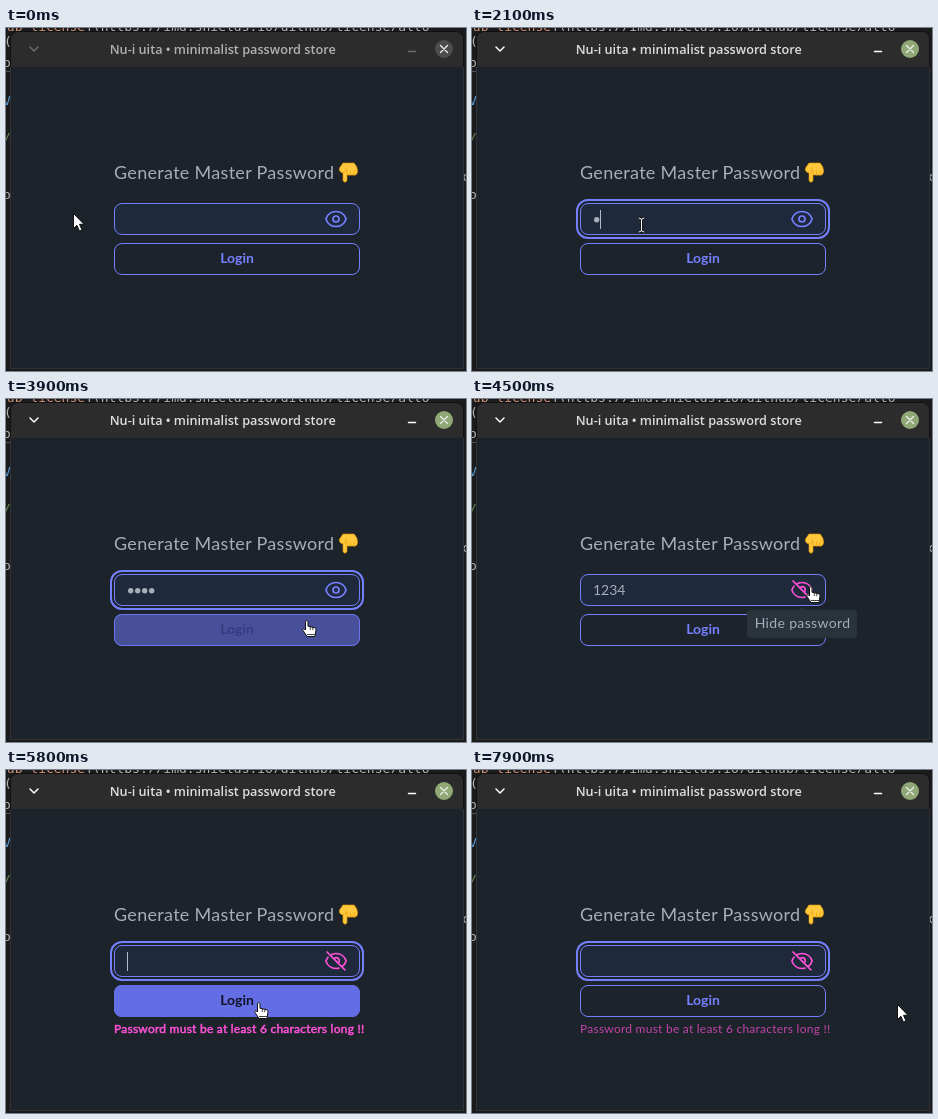
Recreate the animation shown at these times as an HTML page. Size 460 by 343 pixels, loop 8000 ms.

```html
<!DOCTYPE html>
<html lang="en">
<head>
<meta charset="utf-8">
<title>Password store</title>
<style>
  html, body { margin: 0; width: 100%; height: 100%; overflow: hidden; background: #1b1b1b; }
  svg { display: block; width: 460px; height: 343px; }
  text { font-family: Lato, sans-serif; font-size: 14px; fill: #a6adbb; white-space: pre; }
  .code { font: 13px "DejaVu Sans Mono", monospace; fill: #b4b4b4; }
  .title { font: 600 12.7px "Open Sans", sans-serif; text-anchor: middle; }
  .line { fill: none; stroke-linecap: round; stroke-linejoin: round; }
  .login { font-weight: 700; text-anchor: middle; }
  .tip { text-anchor: middle; letter-spacing: .35px; }
  .error { font-size: 12px; letter-spacing: .24px; fill: #ff52d9; stroke: #ff52d9; }
</style>
</head>
<body>
<svg viewBox="0 0 460 343">
  <!-- editor behind the window -->
  <rect width="460" height="343" fill="#1b1b1b"/>
  <text class="code" x="-7" y="3"><tspan fill="#ce9178">hub license</tspan>](https://img.shields.io/github/license/alto</text>
  <text class="code" x="-2" y="18">(</text>
  <text class="code" x="-3" y="39">o</text>
  <text class="code" x="-3" y="77" fill="#569cd6" style="fill:#569cd6">V</text>
  <text class="code" x="-3" y="114" style="fill:#6a8a5a">/</text>
  <text class="code" x="-3" y="171">o</text>
  <text class="code" x="456" y="153">c</text>
  <path d="M0 43.5H4" stroke="#555"/>

  <!-- window -->
  <path d="M4 341V12Q4 3 13 3H449Q458 3 458 12V341Z" fill="#111"/>
  <path d="M5 340V12Q5 4 13 4H449Q457 4 457 12V340Z" fill="#1d232a"/>
  <path d="M5 39V12Q5 4 13 4H449Q457 4 457 12V39Z" fill="#2c2c2c"/>
  <path d="M4.5 39V340.5H457.5V39" fill="none" stroke="#30343a"/>
  <text class="title" id="title" x="216.7" y="26">Nu-i uita • minimalist password store</text>
  <g class="line" id="controls" stroke-width="1.5">
    <path d="M24 19l4 4 4-4"/>
    <path d="M402.5 23.5h7"/>
  </g>
  <circle id="close" cx="438" cy="21" r="9"/>
  <path class="line" d="M434.5 17.5l7 7m0-7l-7 7" stroke="#eee" stroke-width="1.3"/>

  <!-- heading and pointing hand -->
  <text x="108" y="151" style="font-size:18px;letter-spacing:.3px">Generate Master Password</text>
  <g stroke="#e59600" stroke-width=".6">
    <path d="M337 135H348Q352 139 351.5 144Q350.5 148 347 147H341V152.5Q339 156 337 152.5V145Q332.5 144 333.5 140Z" fill="#ffc83d"/>
    <path class="line" d="M341 147V142.5M344.5 147.5V143M348 147V142.5M337 145Q341 144 340 140"/>
  </g>

  <!-- password field -->
  <rect id="ring" x="105" y="172" width="252" height="38" rx="11" fill="none" stroke="#7480ff" stroke-width="2"/>
  <rect x="108.5" y="175.5" width="245" height="31" rx="7.5" fill="#1e293b" stroke="#7480ff"/>
  <g id="dots" fill="#a6adbb"></g>
  <text id="plain" x="121" y="196">1234</text>
  <path id="caret" d="M.5 182V201" stroke="#b4bac6"/>
  <g class="line" transform="translate(318 179)" stroke-width="1.7">
    <g id="eye" stroke="#7480ff">
      <path d="M2 12.3a1 1 0 0 1 0-.6C3.4 7.5 7.4 4.5 12 4.5s8.6 3 10 7.2a1 1 0 0 1 0 .6C20.6 16.5 16.6 19.5 12 19.5S3.4 16.5 2 12.3Z"/>
      <circle cx="12" cy="12" r="3"/>
    </g>
    <path id="slashed" stroke="#ff52d9" d="M4 8.2A10.5 10.5 0 0 0 1.9 12C3.2 16.3 7.2 19.5 12 19.5q1.5 0 2.9-.4M6.2 6.2A10.5 10.5 0 0 1 12 4.5c4.8 0 8.8 3.2 10.1 7.5a10.5 10.5 0 0 1-4.3 5.8M3 3l6.9 6.9M21 21l-6.9-6.9a3 3 0 1 0-4.2-4.2l4.2 4.2"/>
  </g>

  <!-- button, error and tooltip -->
  <rect x="108.5" y="215.5" width="245" height="31" rx="7.5" fill="none" stroke="#7480ff"/>
  <text class="login" x="231" y="235" style="fill:#7480ff">Login</text>
  <g id="hover">
    <rect x="108" y="215" width="246" height="32" rx="8" fill="#646ee4"/>
    <text class="login" x="231" y="235" style="fill:#10122a">Login</text>
  </g>
  <text class="error" id="error" x="108" y="263">Password must be at least 6 characters long !!</text>
  <g id="tooltip">
    <rect id="tipBox" y="211" height="28" rx="4" fill="#2a323c"/>
    <path d="M327 211l3-3 3 3Z" fill="#2a323c"/>
    <text class="tip" id="tipText" x="330.5" y="229"></text>
  </g>

  <!-- pointers -->
  <path id="arrow" d="M.5.5V15.5L3.9 12.3 6.4 18 9 16.9 6.5 11.3H11Z" fill="#fff" stroke="#111"/>
  <g id="beam" class="line">
    <path d="M-2.5-7Q0-7 0-5V5Q0 7-2.5 7M2.5-7Q0-7 0-5V5Q0 7 2.5 7" stroke="#111" stroke-width="2.6"/>
    <path d="M-2.5-7Q0-7 0-5V5Q0 7-2.5 7M2.5-7Q0-7 0-5V5Q0 7 2.5 7" stroke="#fff"/>
  </g>
  <g id="hand" stroke="#111">
    <path d="M3.5 1.8C3.5.2 6 .2 6 1.8V6.2L12 7.5C13.6 7.9 14.2 8.8 14 10L13 16.5H5L1 10.5C.2 9 1.8 8.2 2.8 9.2L3.5 10Z" fill="#fff"/>
    <path d="M8.3 7V10M10.8 7.4V10.2M5 14.5H13" stroke-width=".8"/>
  </g>
</svg>
<script>
const LOOP = 8000, TICK = 100;
const el = id => document.getElementById(id);
const show = (id, opacity) => el(id).setAttribute("opacity", +opacity);
const set = (id, attrs) => {
  for (const [name, value] of Object.entries(attrs)) el(id).setAttribute(name, value);
};
const during = (t, from, to) => t >= from && t < to;
const last = (steps, t) => steps.filter(step => step[0] <= t).pop();

// time, pointer, x, y
const pointer = [
  [0, "arrow", 67, 185], [300, "arrow", 75, 186], [400, "arrow", 95, 189],
  [500, "beam", 120, 193], [600, "beam", 143, 196], [700, "beam", 158, 197],
  [800, "beam", 166, 197], [900, "beam", 169.5, 197],
  [3400, "beam", 190, 201], [3500, "hand", 229, 226], [3600, "hand", 247, 240],
  [3700, "hand", 249, 241], [3800, "hand", 261, 237], [3900, "hand", 296, 221],
  [4000, "arrow", 366, 198], [4100, "beam", 350, 192], [4200, "hand", 336, 188],
  [4300, "hand", 335, 187], [4500, "hand", 334, 187], [4700, "hand", 333, 188],
  [4800, "hand", 325, 192], [4900, "beam", 300, 204], [5000, "hand", 262, 230],
  [5100, "hand", 247, 236], [5300, "hand", 248, 234], [5400, "hand", 248, 232],
  [6100, "hand", 290, 243], [6200, "arrow", 370, 255], [6300, "arrow", 418.5, 241],
  [6400, "arrow", 423, 236], [6500, "arrow", 425, 234]
];
// time, opacity
const hover = [
  [0, 0], [3500, .6], [3600, .95], [3700, 1], [3900, .6], [4000, .1], [4100, 0],
  [5000, .6], [5100, 1], [6100, .8], [6200, .2], [6300, 0]
];
const tooltip = [[0, 0], [4300, .5], [4400, 1], [4900, .5], [5000, 0]];
const error = [[0, 0], [5700, 1], [7700, .92], [7800, .82], [7900, .72]];
const keys = [2100, 2400, 2800, 3200];
const caretResets = [[900], ...keys.map(k => [k]), [5700]];

for (let i = 0; i < keys.length; i++)
  el("dots").innerHTML += `<circle cx="${124.7 + 7 * i}" cy="191.7" r="2.7"/>`;

function render(t) {
  const active = t >= 900, revealed = t >= 4500;
  const focused = during(t, 900, 4500) || t >= 5700;
  const typed = t < 4500 ? keys.filter(k => k <= t).length : 0;

  el("title").style.fill = active ? "#dedede" : "#b2b2b2";
  set("controls", { stroke: active ? "#fff" : "#6c6c6c" });
  set("close", { fill: active ? "#8fa876" : "#4d4d4d" });

  show("ring", focused);
  show("eye", !revealed);
  show("slashed", revealed);
  show("plain", during(t, 4500, 5700));
  [...el("dots").children].forEach((dot, i) => dot.setAttribute("opacity", +(i < typed)));

  const reset = last(caretResets, t);
  show("caret", focused && Math.floor((t - reset[0]) / 600) % 2 === 0);
  set("caret", { transform: `translate(${121 + 7 * typed} 0)` });

  show("hover", last(hover, t)[1]);
  show("error", last(error, t)[1]);
  set("error", { "stroke-width": t < 7700 ? .5 : 0 });

  show("tooltip", last(tooltip, t)[1]);
  const width = revealed ? 110 : 118;
  set("tipBox", { x: 330 - width / 2, width });
  el("tipText").textContent = revealed ? "Hide password" : "Show password";

  const [, shape, x, y] = last(pointer, t);
  for (const id of ["arrow", "beam", "hand"]) show(id, id === shape);
  set(shape, { transform: `translate(${x} ${y})` });
}

const start = performance.now();
function frame(now) {
  const t = Math.max(0, now - start) % LOOP;
  render(Math.floor(t / TICK) * TICK);
  requestAnimationFrame(frame);
}
render(0);
requestAnimationFrame(frame);
</script>
</body>
</html>
```
